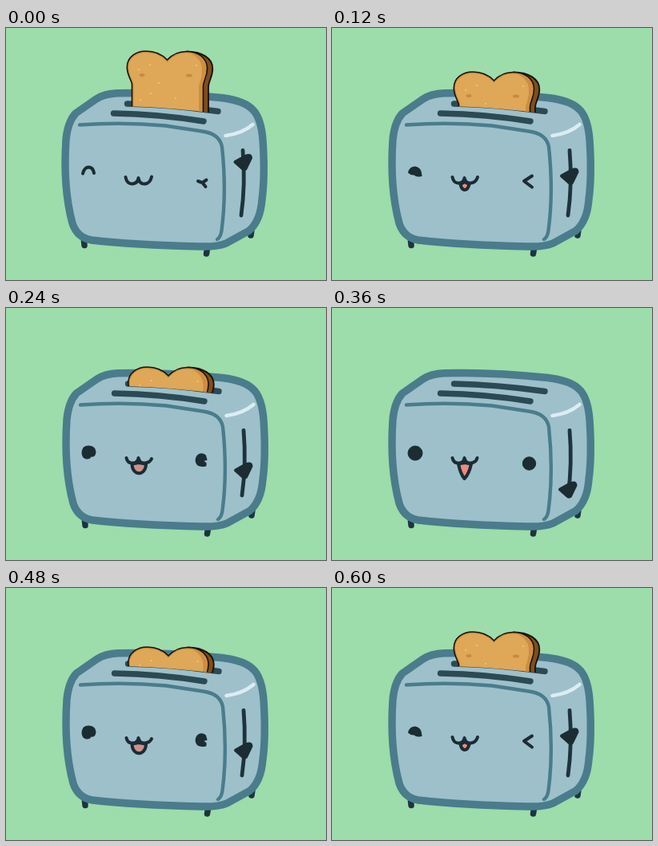
Animation, 400 px wide and 316 px high, one loop 0.72 s. Source, as an HTML page:

```html
<!DOCTYPE html>
<html lang="en">
<head>
<meta charset="utf-8">
<title>Toaster</title>
<style>
  html, body { margin: 0; width: 100%; height: 100%; overflow: hidden; background: #9ddcab; }
  svg { display: block; width: 100%; height: 100%; }
  .line { fill: none; stroke-linecap: round; stroke-linejoin: round; }
  .ink { stroke: #1c2c33; stroke-width: 4; }
  .solid { fill: #1c2c33; stroke: #1c2c33; stroke-linejoin: round; }
</style>
</head>
<body>
<svg viewBox="0 0 400 316" preserveAspectRatio="none">
  <defs>
    <clipPath id="slotClip"><path d="M0 0H400V119L266 107.5Q209 99.5 152 98L0 90Z"/></clipPath>
    <path id="bread" d="M157.5 140V71C157.5 66 151.3 60 151.3 49C151.3 36 163 29 175 29C187 29 196 34 201.5 40C207 34 215 29.5 225 29.5C240 29.5 251 37 251.5 50C252 61 246.5 66 246.5 73V140Z"/>
    <clipPath id="breadClip"><use href="#bread"/></clipPath>
  </defs>
  <rect width="400" height="316" fill="#9ddcab"/>

  <g id="toaster">
    <g class="line" stroke="#1c343f" stroke-width="7.5">
      <path d="M98.5 267L99 272.5"/>
      <path d="M252.5 277L251.5 283"/>
      <path d="M308 253L307 260"/>
    </g>
    <path d="M140 81.8Q200 80 270 87.5Q300 91 311 104Q320 115 322 140Q325 185 321 215Q319 242 305 254L276 270Q266 274.5 245 274Q160 272 108 266Q90 263 84 245Q72 200 76 140Q78 118 88 107L114 89Q124 82.5 140 81.8Z"
      fill="#9dc0cb" stroke="#4a7c8b" stroke-width="9.4"/>
    <g class="line">
      <path d="M93 121.5Q147 117.5 200 122.5L246 129.5Q268 132.5 271 149Q277 205 270.5 254Q269.5 262 265 265" stroke="#4a7c8b" stroke-width="4.4"/>
      <path d="M152.5 95Q205 96 266 104.5M135.5 107Q193 108 248 117" stroke="#2c4a54" stroke-width="7.4"/>
      <path d="M275.5 135Q296 132.5 309.5 121" stroke="#dcecf3" stroke-width="4.6"/>
      <path d="M297 153.5Q300.5 195 295 235" stroke="#1f333c" stroke-width="4.8"/>
    </g>
    <path id="knob" class="solid" stroke-width="4" d="M-10 0L2.5 -7Q9 -10 9.5 -5L3 8.5Q1 10 -1 8Z"/>
  </g>

  <g clip-path="url(#slotClip)">
    <g id="toast">
      <path d="M226 29.5C245 29.5 258.3 38 258.3 51C258.3 62 253 66 253 74V140H215V36Z" fill="#7f4e1b" stroke="#17110a" stroke-width="1.8"/>
      <use href="#bread" fill="#dfa758"/>
      <g clip-path="url(#breadClip)">
        <use href="#bread" fill="none" stroke="#cb8d40" stroke-width="4"/>
        <path d="M224 29Q245 36 245 52Q245 62 241 72V140H252V29Z" fill="#cd8f3f"/>
      </g>
      <use href="#bread" fill="none" stroke="#17110a" stroke-width="1.6"/>
      <g fill="#c98a3e">
        <ellipse cx="170" cy="59" rx="3.5" ry="2"/>
        <ellipse cx="229" cy="59.5" rx="4" ry="2"/>
      </g>
      <g id="crumbs" fill="#efc27d"></g>
    </g>
  </g>

  <g class="pose">
    <path class="line ink" d="M96 182.5Q98 174.5 103.5 174.5Q109 175 110 182"/>
    <path class="line ink" d="M149.5 187Q151 195.5 158 195.5Q165 194.5 165.5 188Q166.5 195.5 173 195.5Q180.5 195 182 186.5"/>
    <path class="line ink" d="M240 192L245.5 194L250.5 190.5M245.5 194L249.5 199"/>
  </g>
  <g class="pose">
    <path class="solid" stroke-width="2" d="M96 181Q98 174.5 104 174.5Q111 175.5 111.5 185Q106 186.5 103 183.5Q99 184 96 181Z"/>
    <path class="line ink" style="fill:#ee8b80" d="M160.5 196Q162 203 166 203Q170 202.5 171.5 196L166 193Z"/>
    <path class="line ink" d="M150.5 187Q152 195 159 194.5Q165 194 165.5 188Q167 195 173 194.5Q180 194 182 187"/>
    <path class="line ink" d="M250 185.5L240 192L250 199.5"/>
  </g>
  <g class="pose">
    <path class="solid" stroke-width="2" d="M95.5 181Q96 173.5 103.5 173.5Q111.5 174 111.5 181Q111 186.5 105.5 185.5Q105 188.5 101 188.5Q95.5 188 95.5 181Z"/>
    <path class="line ink" style="fill:#cf908c" d="M157.5 195.5C157.5 211 175 211 175 195.5L166 194Z"/>
    <path class="line ink" d="M150.5 188Q152 195 159 194.5Q165 194 165.5 188Q167 195 173 194.5Q180 194 182 189"/>
    <path class="solid" stroke-width="2" d="M249 185Q245 181.8 240.5 184.5Q236.5 188.5 238 193.5Q240 199.5 249.5 197.5L249.5 194.5L245 191.5L250.5 190Z"/>
  </g>
  <g class="pose">
    <circle class="solid" cx="104" cy="182" r="9" stroke="none"/>
    <path class="line ink" style="fill:#ee8b80" d="M158 195.5Q160.5 208 165.5 214Q171.500 208 174 195.5L166 194Z"/>
    <path class="line ink" d="M150.5 188Q152 195 159 194.5Q165 194 165.5 188Q167 195 173 194.5Q180 194 181.5 188"/>
    <circle class="solid" cx="246.5" cy="195" r="8.2" stroke="none"/>
  </g>
</svg>
<script>
  const STEP = 120;
  const ORDER = [0, 1, 2, 3, 2, 1];
  const KNOB = [[297.5, 168], [297, 185.5], [297, 203.5], [295, 227.5]];
  const TOAST = [[0, 0], [1, 26], [1.5, 45], [1.5, 90]];
  const CRUMBS = [[180, 46], [166, 52], [191, 69], [181, 82], [238, 47], [212, 88], [168, 90]];

  const get = id => document.getElementById(id);
  const poses = document.querySelectorAll('.pose');
  const move = (id, x, y) => get(id).setAttribute('transform', `translate(${x} ${y})`);

  get('crumbs').innerHTML = CRUMBS
    .map(([x, y]) => `<ellipse cx="${x}" cy="${y}" rx="1.3" ry="0.9"/>`).join('');

  function draw(time) {
    const pose = ORDER[Math.floor(time / STEP) % ORDER.length];
    poses.forEach((g, i) => g.setAttribute('visibility', i === pose ? 'visible' : 'hidden'));
    move('toaster', pose ? 0 : -1, 0);
    move('knob', ...KNOB[pose]);
    move('toast', ...TOAST[pose]);
  }

  const start = performance.now();
  function tick() {
    draw(performance.now() - start);
    requestAnimationFrame(tick);
  }
  tick();
</script>
</body>
</html>
```
